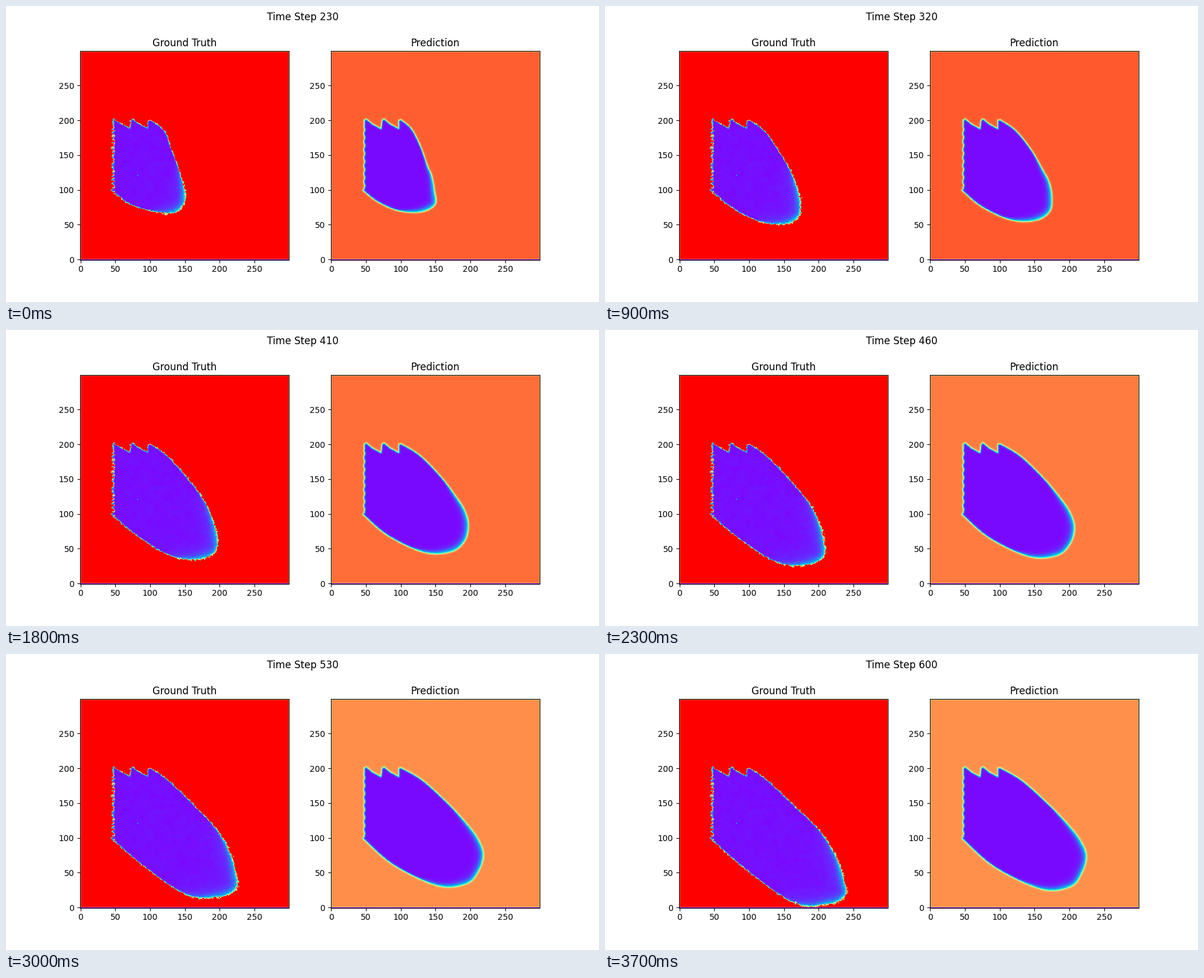
These frames come from a looping animation (1000 px wide and 500 px high, 3800 ms). A matplotlib script:

```python
import numpy as np
import matplotlib.pyplot as plt
from matplotlib.animation import FuncAnimation

SIZE, FRAMES, INTERVAL = 300, 38, 100
ROWS, COLS = slice(0, 216), slice(34, 252)
Y, X = np.mgrid[ROWS, COLS].astype(np.float32)

# Outline of the moving front at the start and the end, from the teeth clockwise.
TRUTH_START = [(120, 185), (130, 160), (140, 134), (147, 112), (151, 95),
               (148, 78), (132, 66), (100, 70), (70, 80)]
TRUTH_END = [(127, 182), (166, 145), (200, 112), (223, 77), (236, 42),
             (238, 17), (212, 4), (163, 7), (92, 57)]
PRED_START = [(115, 188), (128, 163), (138, 135), (144, 121), (148, 100),
              (149, 79), (128, 68), (96, 70), (66, 83)]
PRED_END = [(131, 183), (168, 150), (197, 120), (215, 97), (224, 74),
            (217, 49), (201, 30), (160, 26), (92, 58)]

rng = np.random.default_rng(4)


def smooth(a, passes=1):
    for _ in range(passes):
        for axis in (0, 1):
            a = (np.roll(a, 1, axis) + a + np.roll(a, -1, axis)) / 3
    return a


SPECK = rng.random(X.shape)
ROUGH = 5 * (smooth(rng.random(X.shape)) - 0.5) + rng.random(X.shape) - 0.5
NOTCHES = 5 * (rng.random((len(X), 1)) - 0.5) * ((X < 56) & (Y > 98) & (Y < 192))
CLOUD = 0.02 + 0.08 * (smooth(rng.random(X.shape), 6) - 0.5)
SCALLOPS = 0.7 * np.sin(2 * np.pi * Y / 11.5) * ((X < 53) & (Y > 104) & (Y < 192))


def spline(p, n=5):
    """Catmull-Rom curve through the points."""
    p = np.vstack([p[0], p, p[-1]])
    t = np.linspace(0, 1, n, endpoint=False)[:, None]
    parts = [0.5 * (2 * b + (c - a) * t + (2 * a - 5 * b + 4 * c - d) * t**2
                    + (3 * b - a - 3 * c + d) * t**3)
             for a, b, c, d in zip(p, p[1:], p[2:], p[3:])]
    return np.vstack(parts + [p[-1:]])


def signed_distance(poly):
    best = np.full(X.shape, 1e9, np.float32)
    inside = np.zeros(X.shape, bool)
    for (ax, ay), (bx, by) in zip(poly.tolist(), np.roll(poly, -1, 0).tolist()):
        ex, ey = bx - ax, by - ay
        wx, wy = X - ax, Y - ay
        h = np.clip((wx * ex + wy * ey) / (ex * ex + ey * ey + 1e-9), 0, 1)
        best = np.minimum(best, (wx - ex * h)**2 + (wy - ey * h)**2)
        if ey:
            inside ^= ((Y < ay) != (Y < by)) & (wx < wy * (ex / ey))
    return np.where(inside, -1, 1) * np.sqrt(best)


def teeth(lean):
    pts = [(47, 102)]
    for x in (47, 72.5):
        pts += [(x, 200), (x + lean, 202.5), (x + 12, 195), (x + 24, 188.5)]
    return pts + [(96.5, 200)]


def shape(start, end, s, spread, lean):
    """Distance to the outline, and how strongly each cell belongs to the front."""
    start, end = np.array(start, float), np.array(end, float)
    # The shoulder eases out; points further round move almost evenly.
    power = 1 + 1.2 * spread ** np.arange(len(start))[:, None]
    pts = start + (end - start) * (1 - (1 - s) ** power)
    curve = spline(np.vstack([(100, 201), pts, (45, 99.5)]))
    reach = (curve[:, 0] - 0.5 * curve[:, 1]).max()
    front = np.clip(((X - 0.5 * Y) / reach - 0.55) / 0.35, 0, 1)
    return signed_distance(np.vstack([curve, teeth(lean)])), front


def field(cells, background):
    """Place the cells on the full grid, whose outermost ring is zero."""
    out = np.full((SIZE, SIZE), background, float)
    out[ROWS, COLS] = cells
    out[[0, -1]] = 0
    out[:, [0, -1]] = 0
    return out


def truth(s):
    d, front = shape(TRUTH_START, TRUTH_END, s, spread=0.6, lean=1)
    burnt = d + ROUGH * (1 + front) + NOTCHES < 0
    tail = np.minimum(d, 0)
    glow = 0.4 * np.exp(tail / (1.5 + 2 * front)) * (0.4 + SPECK) + 0.08 * np.exp(tail / 15)
    v = CLOUD + front * glow + 0.35 * SPECK * (d > -1.2)
    cells = np.where(burnt, np.clip(v, 0, 0.75), 1)
    cells[121, 82 - COLS.start] = 0.5
    return field(cells, 1)


def prediction(s):
    d, front = shape(PRED_START, PRED_END, s, spread=0.82, lean=3)
    d = d + 0.5 + SCALLOPS
    bg = np.interp(s, [0, 0.135, 0.35, 0.82, 1], [0.878, 0.89, 0.877, 0.81, 0.807])
    inner = 0.5 * np.exp(np.minimum(d, 0) / (0.8 + 2.8 * front))
    outer = 1 - 0.5 * np.exp(-np.maximum(d, 0) / 0.8)
    return field(bg * np.where(d < 0, inner, outer) + 0.012 * (d < 0), bg)


fig, axes = plt.subplots(1, 2, figsize=(10, 5), dpi=100)
title = fig.suptitle("Time Step 230")
images = []
for ax, name in zip(axes, ("Ground Truth", "Prediction")):
    ax.set_title(name)
    images.append(ax.imshow(np.zeros((SIZE, SIZE)), cmap="rainbow", vmin=0, vmax=1, origin="lower"))
    ax.set_xticks(range(0, SIZE, 50))
    ax.set_yticks(range(0, SIZE, 50))


def update(i):
    s = i / (FRAMES - 1)
    title.set_text(f"Time Step {230 + 10 * i}")
    images[0].set_data(truth(s))
    images[1].set_data(prediction(s))
    return [title, *images]


anim = FuncAnimation(fig, update, frames=FRAMES, interval=INTERVAL, repeat=True, repeat_delay=0)
plt.show()
```
